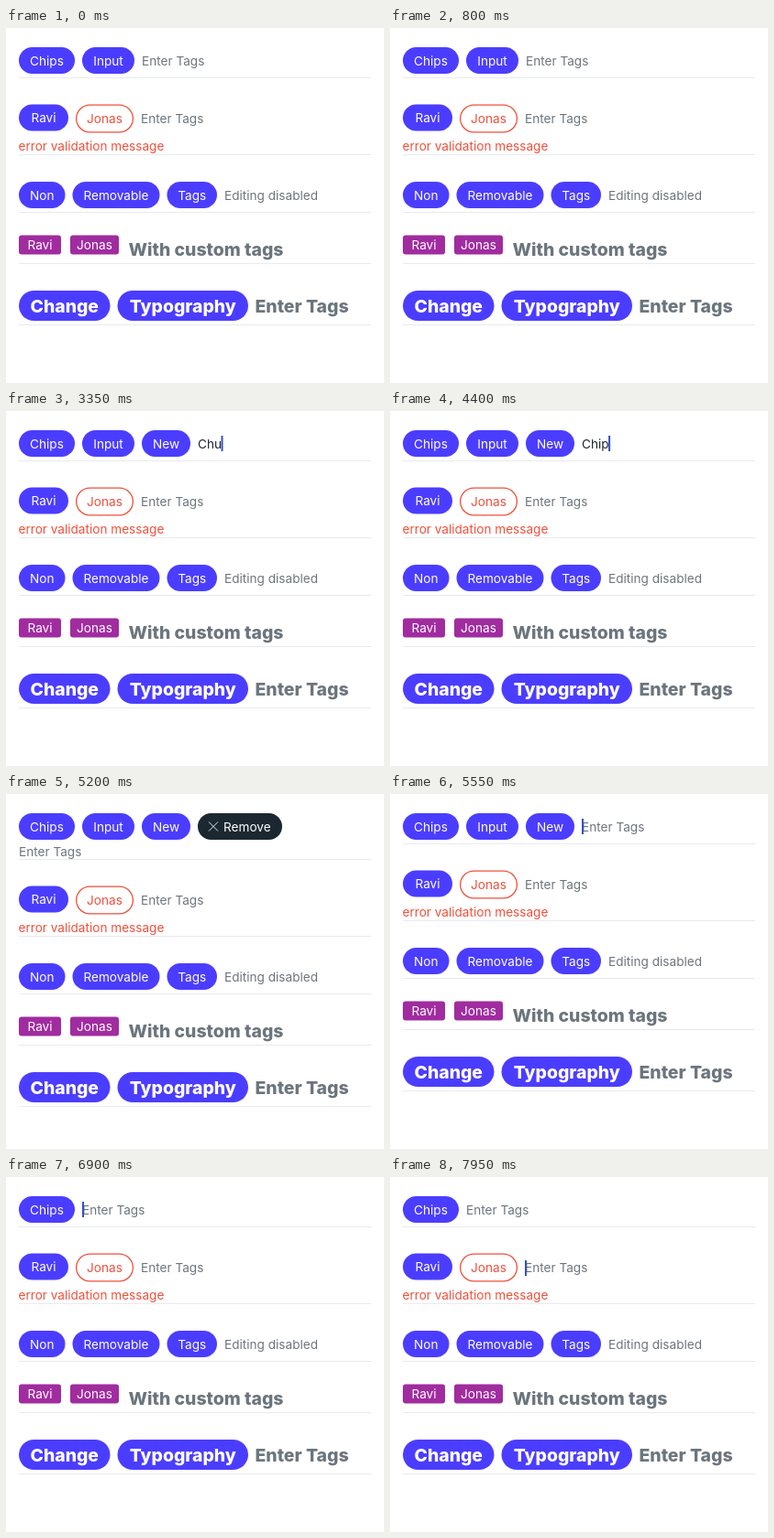
An HTML page that plays this animation: 412x388 px, repeating every 8 s.

```html
<!DOCTYPE html>
<html lang="en">
<head>
<meta charset="utf-8">
<title>Chips input</title>
<style>
  html, body { margin: 0; width: 100%; height: 100%; overflow: hidden; background: #fff; }
  svg { display: block; width: 412px; height: 388px; }
  text {
    font: 400 13.6px Inter, "Open Sans", sans-serif;
    font-optical-sizing: none;
    white-space: pre;
  }
  .big { font-size: 19.4px; font-weight: 800; }
  .hint { fill: #6c757d; }
  .on { fill: #fff; }
  .typed { fill: #1c2630; }
  .error { fill: #f0503c; }
  .chip { fill: #4b3dff; }
  .tag { fill: #a02c9f; }
  .selected { fill: #1c2831; }
  .invalid { fill: #fff; stroke: #f0503c; stroke-width: 1.3; }
  .cross { stroke: #dfe3e6; stroke-width: 1; }
  .rule { fill: #e8eaed; }
  .caret { fill: #3350c8; }
</style>
</head>
<body>
<svg viewBox="0 0 412 388">
  <g id="first"></g>
  <g id="rest"></g>
</svg>
<script>
const LOOP = 8000;
const WRAP = 17;
const RIGHT = 398;
const PLACEHOLDER = 'Enter Tags';
const MIN_INPUT_WIDTH = 80;
const REMOVE_WIDTH = 92;
const chipWidths = { Chips: 61, Input: 57, New: 53, Chip: 53 };

const first = document.getElementById('first');
const rest = document.getElementById('rest');

function add(parent, name, attrs, content) {
  const node = document.createElementNS('http://www.w3.org/2000/svg', name);
  for (const key in attrs) node.setAttribute(key, attrs[key]);
  if (content) node.textContent = content;
  parent.append(node);
  return node;
}

const label = (parent, x, y, content, cls, anchor = 'start') =>
  add(parent, 'text', { x, y, class: cls, 'text-anchor': anchor }, content);

const box = (parent, x, y, width, height, rx, cls) =>
  add(parent, 'rect', { x, y, width, height, rx, class: cls });

const rule = (parent, y) => box(parent, 14, y, RIGHT - 14, 1, 0, 'rule');

function pill(parent, x, y, width, content, cls = 'chip', textClass = 'on') {
  box(parent, x, y, width, 29, 14.5, cls);
  label(parent, x + width / 2, y + 19.6, content, textClass, 'middle');
}

function removePill(parent, x, y) {
  box(parent, x, y, REMOVE_WIDTH, 29, 14.5, 'selected');
  add(parent, 'path', { d: `M${x + 12} ${y + 9.5}l10 10m0 -10l-10 10`, class: 'cross' });
  label(parent, x + 28, y + 19.6, 'Remove', 'on');
}

function tag(x, width, content) {
  box(rest, x, 226.5, width, 21, 3, 'tag');
  label(rest, x + width / 2, 242, content, 'on', 'middle');
}

function bigPill(x, width, content) {
  box(rest, x, 287, width, 33, 16.5, 'chip');
  label(rest, x + width / 2, 311, content, 'on big', 'middle');
}

rule(rest, 54);
pill(rest, 14, 83.5, 54, 'Ravi');
box(rest, 76.6, 84.1, 61.8, 29.8, 14.9, 'invalid');
label(rest, 107.5, 104, 'Jonas', 'error', 'middle');
label(rest, 147, 104, PLACEHOLDER, 'hint');
label(rest, 13.5, 133.6, 'error validation message', 'error');
rule(rest, 138);

pill(rest, 14, 168, 50.5, 'Non');
pill(rest, 72.5, 168, 95, 'Removable');
pill(rest, 175.5, 168, 54.5, 'Tags');
label(rest, 238, 187.6, 'Editing disabled', 'hint');
rule(rest, 201);

tag(14, 46, 'Ravi');
tag(70, 53, 'Jonas');
label(rest, 133.5, 249, 'With custom tags', 'hint big');
rule(rest, 257);

bigPill(14, 99.5, 'Change');
bigPill(121.5, 142.5, 'Typography');
label(rest, 271.5, 311, PLACEHOLDER, 'hint big');
rule(rest, 324);

const secondCaret = box(rest, 147, 91, 2, 17, 0, 'caret');

// Each step: start, number of chips, focus (0 none, 1 first row, 2 second row), draft, last chip selected
const steps = [
  [0, 2, 0],
  [1900, 2, 1],
  [2150, 2, 1, 'N'],
  [2300, 2, 1, 'Ne'],
  [2450, 2, 1, 'New'],
  [2700, 3, 1],
  [2950, 3, 1, 'C'],
  [3100, 3, 1, 'Ch'],
  [3300, 3, 1, 'Chu'],
  [3700, 3, 1, 'Ch'],
  [3950, 3, 1, 'Chi'],
  [4150, 3, 1, 'Chip'],
  [4600, 4, 1],
  [5150, 4, 0, '', true],
  [5400, 3, 1],
  [5600, 3, 0, '', true],
  [5900, 2, 1],
  [6450, 2, 0, '', true],
  [6700, 1, 1],
  [7600, 1, 0],
  [7750, 1, 2]
];
const names = Object.keys(chipWidths);
let current = null;
let firstCaret = null;

function renderStep([, count, focus, draft = '', selected]) {
  first.replaceChildren();
  let x = 14;
  names.slice(0, count).forEach((name, i) => {
    const removing = selected && i === count - 1;
    if (removing) removePill(first, x, 21);
    else pill(first, x, 21, chipWidths[name], name);
    x += (removing ? REMOVE_WIDTH : chipWidths[name]) + 8;
  });

  const wrapped = x + MIN_INPUT_WIDTH > RIGHT - 14;
  const shift = wrapped ? WRAP : 0;
  if (wrapped) x = 14;
  const y = wrapped ? 67.5 : 40.6;
  const input = label(first, x, y, draft || PLACEHOLDER, draft ? 'typed' : 'hint');
  const caretX = draft ? x - 0.5 + input.getComputedTextLength() : x;
  firstCaret = focus === 1 ? box(first, caretX, y - 13.6, 2, 17, 0, 'caret') : null;
  rest.setAttribute('transform', `translate(0 ${shift})`);
}

function draw(now) {
  const t = now % LOOP;
  const step = steps.findLast(s => s[0] <= t);
  if (step !== current) renderStep(current = step);
  const lit = (t - step[0]) % 1000 < 600;
  if (firstCaret) firstCaret.style.opacity = lit ? 1 : 0;
  secondCaret.style.opacity = step[2] === 2 && lit ? 1 : 0;
}

const start = performance.now();
function frame() {
  draw(performance.now() - start);
  requestAnimationFrame(frame);
}
frame();
</script>
</body>
</html>
```
